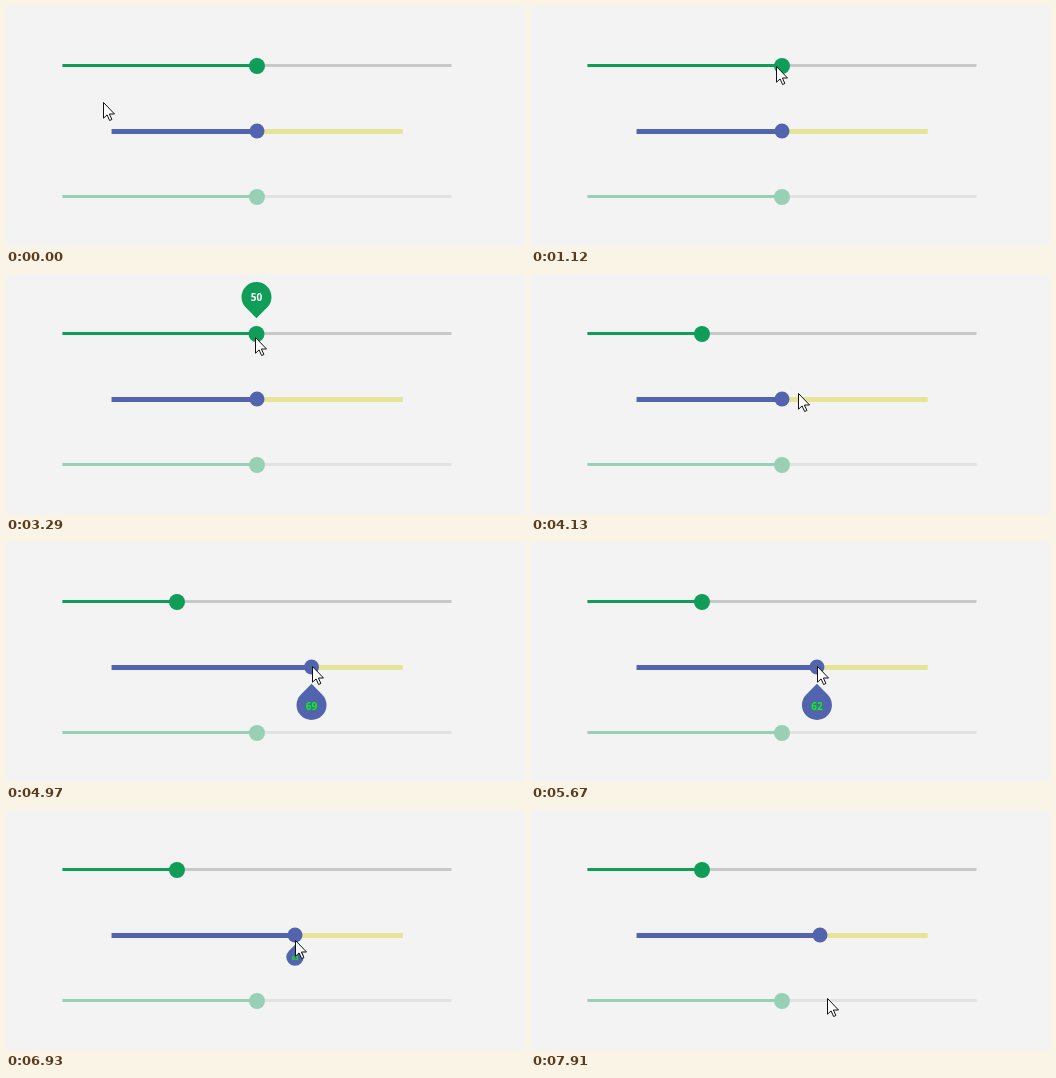
Recreate the animation shown at these times as an HTML page. Size 519 px wide and 240 px high, loop 8 s.

```html
<!DOCTYPE html>
<html lang="en">
<head>
<meta charset="utf-8">
<title>Sliders</title>
<style>
  html, body { margin: 0; width: 100%; height: 100%; overflow: hidden; background: #f3f3f3; }
  svg { display: block; width: 519px; height: 240px; }
  text { font: 700 10px "Open Sans", sans-serif; text-anchor: middle; }
</style>
</head>
<body>
<svg id="stage" viewBox="0 0 519 240"></svg>
<script>
const LOOP = 8000, STEP = 70, GROW = 140, SHRINK = 200;
const stage = document.getElementById('stage');

const smooth = k => k * k * (3 - 2 * k);
const speedUp = k => k * k;
const slowDown = k => 1 - (1 - k) ** 1.215;
const clamp = (v, a, b) => Math.min(b, Math.max(a, v));

// Pointer moves: start, end, x and y to reach, easing; it rests in between
const HOME = [97, 96];
const MOVES = [
  [140, 700, 270, 66],
  [700, 1120, 245, 60],
  [1190, 1680, 250, 63],
  [1700, 2590, 354, 63, speedUp],
  [2870, 3640, 170, 63],
  [3710, 4130, 267, 119],
  [4130, 4340, 251, 123],
  [4550, 5320, 347, 124],
  [5460, 6090, 190, 124, slowDown],
  [6300, 6790, 289, 124],
  [6876, 7140, 285, 183],
  [7140, 7490, 213, 191],
  [7490, 7910, 296, 188]
];

// A pin sits above its knob when pinY is negative, below it otherwise
const SLIDERS = [
  { left: 56.5, right: 445.5, knobY: 60, h: 3, r: 8, fill: '#0f9d58', rail: '#c8c8c8',
    pinY: -37, ink: '#fff', press: 1680, release: 3650, dx: 1 },
  { left: 105.6, right: 396.8, knobY: 125, h: 5, r: 7.5, fill: '#5264ae', rail: '#e6e498',
    pinY: 38, ink: '#0f0', press: 4480, release: 6846, dx: 0 },
  { left: 56.5, right: 445.5, knobY: 191, h: 3, r: 8, fill: '#98d0b5', rail: '#e2e2e2' }
];

function add(tag, attrs, parent = stage) {
  const el = document.createElementNS('http://www.w3.org/2000/svg', tag);
  for (const k in attrs) el.setAttribute(k, attrs[k]);
  return parent.appendChild(el);
}

function pointerAt(t) {
  let [x, y] = HOME;
  for (const [start, end, toX, toY, ease = smooth] of MOVES) {
    const k = ease(clamp((t - start) / (end - start), 0, 1));
    x += (toX - x) * k;
    y += (toY - y) * k;
  }
  return [x, y];
}

function build(s) {
  const bar = { x: s.left, y: s.knobY - 2, width: s.right - s.left, height: s.h };
  add('rect', { ...bar, fill: s.rail });
  s.bar = add('rect', { ...bar, fill: s.fill });
  s.knob = add('circle', { cy: s.knobY, r: s.r, fill: s.fill });
  if (!s.pinY) return;
  const above = s.pinY < 0;
  s.pin = add('g', {});
  add('path', {
    d: 'M15 15V0A15 15 0 1 0 0 15Z', fill: s.fill,
    transform: `translate(0 ${s.pinY}) rotate(${above ? 45 : 225})`
  }, s.pin);
  s.label = add('text', { y: s.pinY + (above ? 4 : 5), fill: s.ink }, s.pin);
}

function place(s, t) {
  const x = s.pinY ? pointerAt(clamp(t, s.press, s.release))[0] + s.dx : 251;
  s.bar.setAttribute('width', x - s.left);
  s.knob.setAttribute('cx', x);
  if (!s.pinY) return;
  const scale = clamp((t - s.press) / GROW, 0, 1) * clamp(1 - (t - s.release) / SHRINK, 0, 1);
  s.pin.setAttribute('transform', `translate(${x} ${s.knobY}) scale(${scale})`);
  s.pin.setAttribute('visibility', scale > 0 ? 'visible' : 'hidden');
  s.label.textContent = Math.round((x - s.left) / (s.right - s.left) * 100);
}

SLIDERS.forEach(build);
const pointer = add('path', {
  d: 'M.5 .5V16.2L4.1 12.9L6.6 18.5L8.9 17.5L6.4 12H11.5Z',
  fill: '#fff', stroke: '#111', 'stroke-width': 1
});

function draw(now) {
  const t = Math.floor(now % LOOP / STEP) * STEP;
  SLIDERS.forEach(s => place(s, t));
  const [x, y] = pointerAt(t).map(Math.round);
  pointer.setAttribute('transform', `translate(${x} ${y})`);
}

const start = performance.now();
function tick() {
  draw(performance.now() - start);
  requestAnimationFrame(tick);
}
tick();
</script>
</body>
</html>
```
